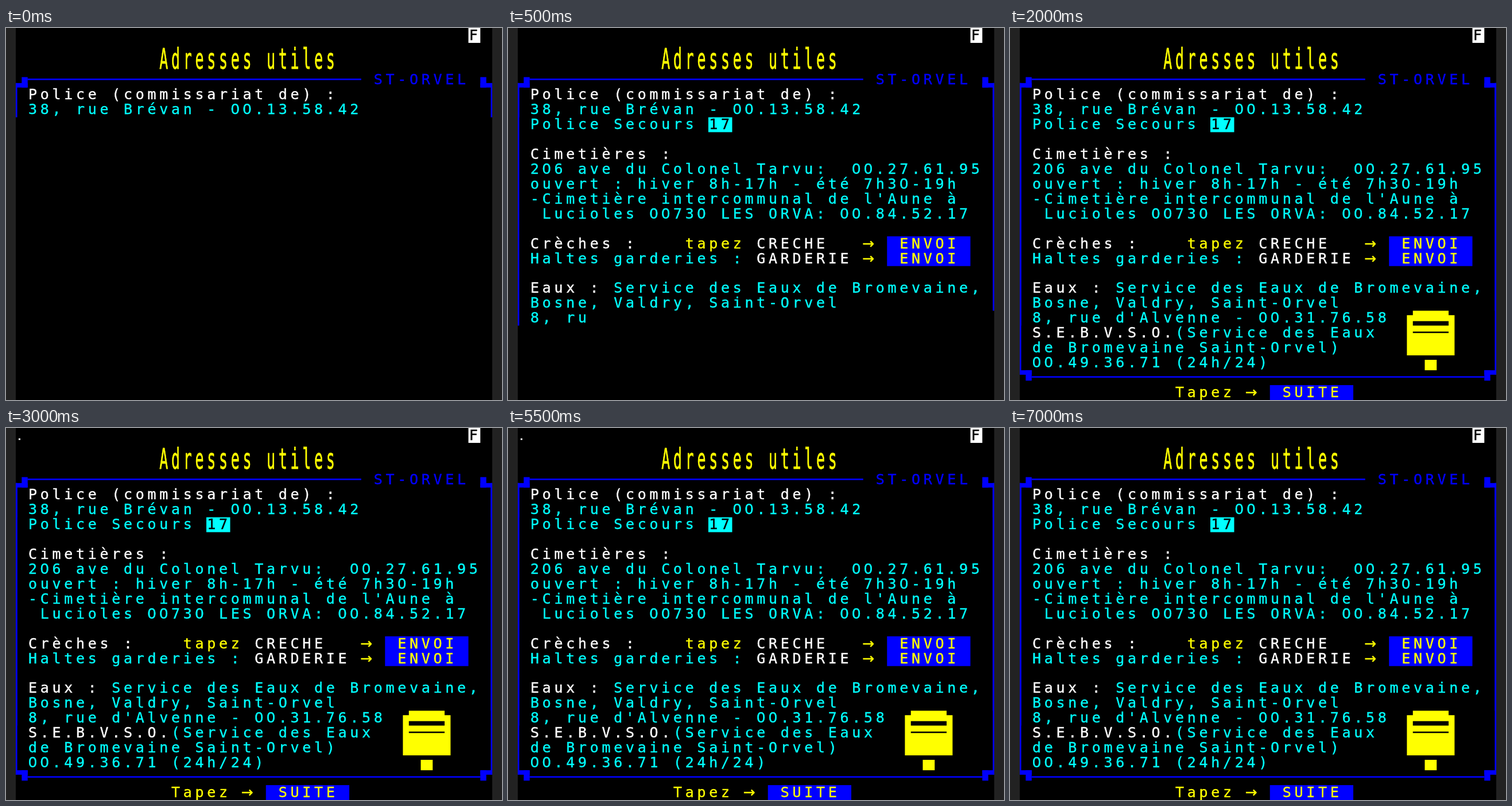
Recreate the animation shown at these times as an HTML page. Size 864x648 px, loop 8 s.

```html
<!DOCTYPE html>
<html lang="fr">
<head>
<meta charset="utf-8">
<title>Adresses utiles</title>
<style>
  html, body { margin: 0; width: 100%; height: 100%; overflow: hidden; background: #000; }
  svg { display: block; width: 864px; height: 648px; }
  text { font: 25px "DejaVu Sans Mono", monospace; text-anchor: middle; white-space: pre; stroke-width: .4px; }
  .wide { font-family: "DejaVu Sans", sans-serif; }
</style>
</head>
<body>
<svg viewBox="0 0 864 648">
  <rect width="17" height="648" fill="#222"/>
  <rect x="847" width="17" height="648" fill="#222"/>
  <g class="step"></g>
  <g class="step"></g>
  <g class="step"></g>
  <rect id="dot" x="22" y="18" width="3" height="3" fill="#fff"/>
</svg>
<script>
const LOOP = 8000;
const STEP_TIMES = [0, 500, 1000];
const DOT_ON = [[1500, 2000], [3000, 4500], [5500, 7000]];

// 40 x 25 character grid, each cell 8 x 10 dots
const LEFT = 17, CELL_W = 20.75, CELL_H = 25.92, DOT_W = 1 / 8;
const WHITE = '#fff', CYAN = '#0ff', YELLOW = '#ff0', BLUE = '#00f', BLACK = '#000';
const colX = col => LEFT + col * CELL_W;
const rowY = row => row * CELL_H;

const steps = [...document.querySelectorAll('.step')];
const dot = document.getElementById('dot');
let layer;

function add(markup) {
  layer.insertAdjacentHTML('beforeend', markup);
}

// All box edges are in grid units
function box(col, row, endCol, endRow, color) {
  add(`<rect x="${colX(col)}" y="${rowY(row)}" width="${(endCol - col) * CELL_W}" height="${(endRow - row) * CELL_H}" fill="${color}"/>`);
}

function write(row, col, text, color, transform = '') {
  const xs = [...text].map((_, i) => (colX(col + i) + 8.7).toFixed(2)).join(' ');
  const content = text.replace(/[0→]/g, '<tspan class="wide">$&</tspan>');
  add(`<text x="${xs}" y="${rowY(row) + 20.7}" fill="${color}" stroke="${color}" transform="${transform}">${content}</text>`);
}

function sides(leftEnd, rightEnd = leftEnd) {
  box(0, 3.7, DOT_W, leftEnd, BLUE);
  box(40 - DOT_W, 3.7, 40, rightEnd, BLUE);
}

// Stepped corner blocks: a full-width bar and a taller inner half
function corners(barTop, innerTop) {
  for (const [col, inner] of [[0, 0.5], [39, 39]]) {
    box(col, barTop, col + 1, barTop + 0.3, BLUE);
    box(inner, innerTop, inner + 0.5, innerTop + 0.7, BLUE);
  }
}

layer = steps[0];
box(38, 0, 39, 1, WHITE);
write(0, 38, 'F', BLACK);
write(0, 12, 'Adresses utiles', YELLOW, 'translate(0 29.4) scale(1 2)');
corners(3.7, 3.3);
box(1, 3.4, 29, 3.5, BLUE);
write(3, 30, 'ST-ORVEL', BLUE);
sides(6);
write(4, 1, 'Police (commissariat de) :', WHITE);
write(5, 1, '38, rue Brévan - 00.13.58.42', CYAN);

layer = steps[1];
sides(20, 19);
write(6, 1, 'Police Secours', CYAN);
box(16, 6, 18, 7, CYAN);
write(6, 16, '17', BLACK);
write(8, 1, 'Cimetières :', WHITE);
write(9, 1, '206 ave du Colonel Tarvu:', CYAN);
write(9, 28, '00.27.61.95', CYAN);
write(10, 1, 'ouvert : hiver 8h-17h - été 7h30-19h', CYAN);
write(11, 1, "-Cimetière intercommunal de l'Aune à", CYAN);
write(12, 2, 'Lucioles 00730 LES ORVA: 00.84.52.17', CYAN);
write(14, 1, 'Crèches :', WHITE);
write(14, 14, 'tapez', YELLOW);
write(15, 1, 'Haltes garderies :', CYAN);
box(31, 14, 38, 16, BLUE);
['CRECHE', 'GARDERIE'].forEach((word, i) => {
  write(14 + i, 20, word, WHITE);
  write(14 + i, 29, '→', YELLOW);
  write(14 + i, 32, 'ENVOI', YELLOW);
});
write(17, 1, 'Eaux :', WHITE);
write(17, 8, 'Service des Eaux de Bromevaine,', CYAN);
write(18, 1, 'Bosne, Valdry, Saint-Orvel', CYAN);
write(19, 1, '8, ru', CYAN);

layer = steps[2];
sides(23.3);
write(19, 6, "e d'Alvenne - 00.31.76.58", CYAN);
write(20, 1, 'S.E.B.V.S.O.', WHITE);
write(20, 13, '(Service des Eaux', CYAN);
write(21, 1, 'de Bromevaine Saint-Orvel)', CYAN);
write(22, 1, '00.49.36.71 (24h/24)', CYAN);
box(33, 19, 36, 20, YELLOW);
box(32.5, 19.3, 36.5, 22, YELLOW);
box(33, 19.7, 36, 20, BLACK);
box(33, 20.4, 36, 20.5, BLACK);
box(34, 22.3, 35, 23, YELLOW);
corners(23, 23);
box(1, 23.4, 39, 23.5, BLUE);
write(24, 13, 'Tapez', YELLOW);
write(24, 19, '→', YELLOW);
box(21, 24, 28, 25, BLUE);
write(24, 22, 'SUITE', YELLOW);

function show(element, visible) {
  element.setAttribute('visibility', visible ? 'visible' : 'hidden');
}

function draw(now) {
  const t = now % LOOP;
  steps.forEach((step, i) => show(step, t >= STEP_TIMES[i]));
  show(dot, DOT_ON.some(([from, to]) => t >= from && t < to));
  requestAnimationFrame(draw);
}
draw(0);
</script>
</body>
</html>
```
